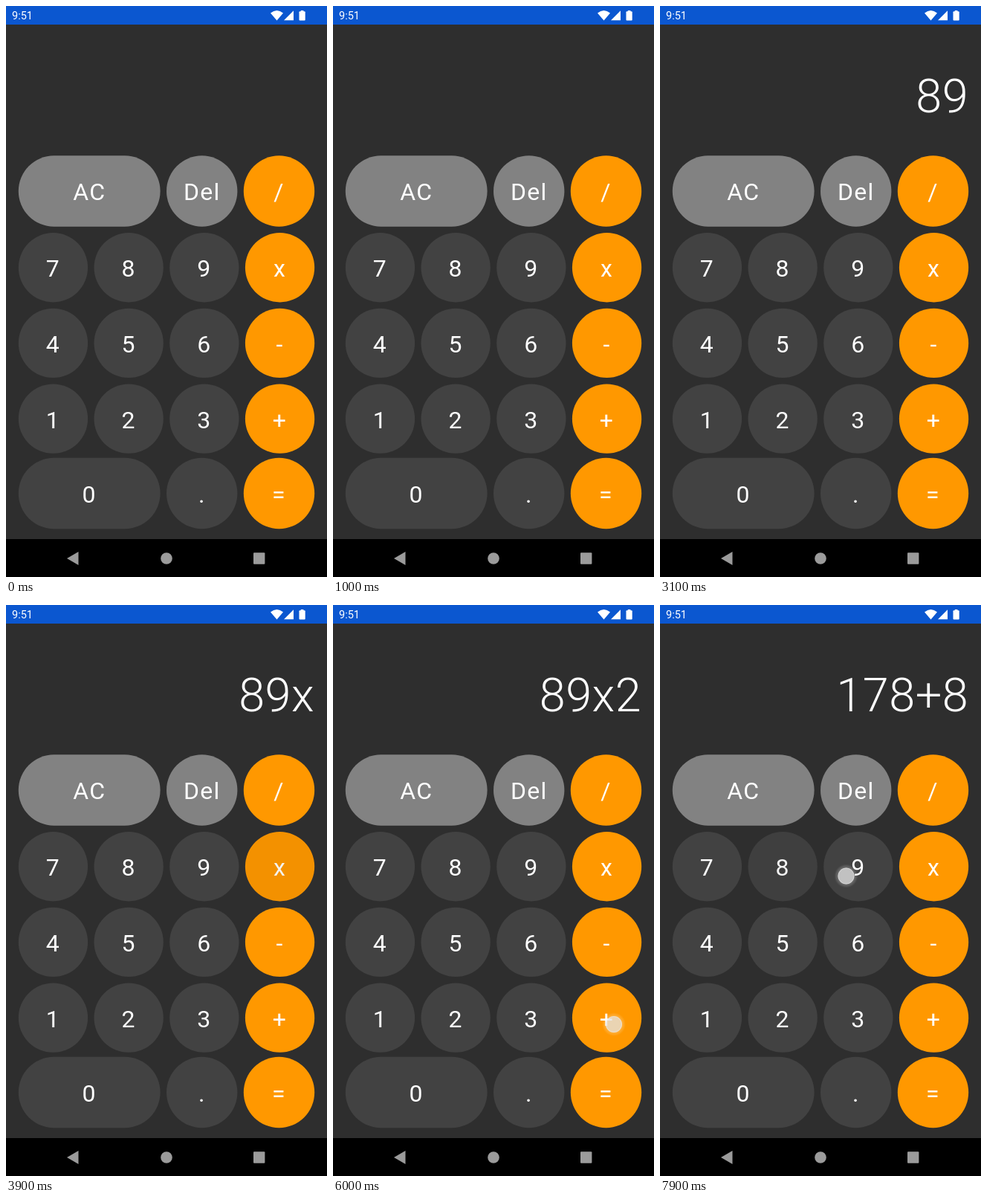
An HTML page with a canvas that plays this animation: 432x768 px, repeating every 8000 ms.

```html
<!DOCTYPE html>
<html lang="en">
<head>
<meta charset="utf-8">
<title>Calculator</title>
<style>
  html, body { margin: 0; width: 100%; height: 100%; overflow: hidden; background: #2e2e2e; }
  canvas { display: block; width: 432px; height: 768px; }
</style>
</head>
<body>
<canvas id="stage"></canvas>
<script>
const W = 432, H = 768, LOOP = 8000, STEP = 100;
const LIGHT = '#828282', DARK = '#424242', ORANGE = '#ff9800';
const canvas = document.getElementById('stage');
const ctx = canvas.getContext('2d');
const dpr = window.devicePixelRatio || 1;
canvas.width = W * dpr;
canvas.height = H * dpr;

const LEFT = 16.8, GAP = 8.4, BIG = 95.4, SMALL = 93.3;
const rows = [
  { y: 201.3, size: BIG, keys: ['AC', 'Del', '/'], wide: true },
  { y: 305.1, size: SMALL, keys: ['7', '8', '9', 'x'] },
  { y: 406.8, size: SMALL, keys: ['4', '5', '6', '-'] },
  { y: 508.5, size: SMALL, keys: ['1', '2', '3', '+'] },
  { y: 607.8, size: BIG, keys: ['0', '.', '='], wide: true }
];

const buttons = rows.flatMap(({ y, size, keys, wide }) => {
  let x = LEFT;
  return keys.map((label, i) => {
    const w = wide && i === 0 ? size * 2 : size;
    const color = i === keys.length - 1 ? ORANGE : /^(AC|Del)$/.test(label) ? LIGHT : DARK;
    const button = { label, x, y, w, h: size, color };
    x += w + GAP;
    return button;
  });
});

// down: finger lands, hold: time until it lifts and the display updates
const taps = [
  { key: '8', x: 151, y: 365, down: 1900, hold: 200, shows: '8' },
  { key: '9', x: 252, y: 365, down: 2300, hold: 200, shows: '89' },
  { key: 'x', x: 376, y: 366, down: 3500, hold: 200, shows: '89x' },
  { key: '2', x: 168, y: 565, down: 4200, hold: 200, shows: '89x2' },
  { key: '+', x: 378, y: 564, down: 6000, hold: 300, shows: '178+' },
  { key: '8', x: 151, y: 365, down: 7500, hold: 200, shows: '178+8' },
  { key: '9', x: 250.5, y: 364.5, down: 7900, hold: 200, shows: '178+89' }
];

const clamp = v => Math.max(0, Math.min(1, v));

function text(str, x, y, font, align, spacing = 0) {
  ctx.font = font + ' Roboto, sans-serif';
  ctx.textAlign = align;
  ctx.letterSpacing = spacing + 'px';
  ctx.fillStyle = '#fff';
  ctx.fillText(str, x, y);
}

function shape(color, draw) {
  ctx.fillStyle = color;
  ctx.beginPath();
  draw();
  ctx.fill();
}

function polygon(color, ...points) {
  shape(color, () => points.forEach(([x, y]) => ctx.lineTo(x, y)));
}

function disc(color, x, y, r) {
  shape(color, () => ctx.arc(x, y, r, 0, Math.PI * 2));
}

function box(color, x, y, w, h, r = 0) {
  shape(color, () => ctx.roundRect(x, y, w, h, r));
}

function statusBar() {
  box('#0b57d0', 0, 0, W, 25);
  text('9:51', 8, 18, '14.5px', 'left');
  shape('#fff', () => {
    ctx.moveTo(364.5, 19.5);
    ctx.lineTo(356, 9.5);
    ctx.quadraticCurveTo(364.5, 2.5, 373, 9.5);
  });
  polygon('#fff', [374, 19.3], [387, 19.3], [387, 6.3]);
  box('#fff', 394.5, 7.3, 8.2, 12.2, 1);
  box('#fff', 396.8, 6, 3.6, 2);
}

function navBar() {
  const gray = '#9b9b9b';
  box('#000', 0, 717, W, H - 717);
  polygon(gray, [82, 743], [97.5, 734], [97.5, 752]);
  disc(gray, 216, 743, 7.8);
  box(gray, 333, 735.3, 15.4, 15.4, 1);
}

function ripple(tap, t) {
  const age = t - tap.down, fadeStart = tap.hold + 50;
  const alpha = 0.12 * clamp((age - 25) / 75) * clamp(1 - (age - fadeStart) / 250);
  if (alpha <= 0) return;
  disc(`rgba(0,0,0,${alpha})`, tap.x, tap.y, 20 + 90 * clamp((age - 25) / 150));
}

function button(b, t) {
  ctx.save();
  ctx.beginPath();
  ctx.roundRect(b.x, b.y, b.w, b.h, b.h / 2);
  ctx.fillStyle = b.color;
  ctx.fill();
  text(b.label, b.x + b.w / 2, b.y + b.h / 2 + 12.4, '32px', 'center', 1.2);
  const pressed = taps.filter(tap => tap.key === b.label && t > tap.down);
  if (pressed.length) {
    ctx.clip();
    pressed.forEach(tap => ripple(tap, t));
  }
  ctx.restore();
}

function finger({ x, y }) {
  const halo = ctx.createRadialGradient(x, y, 10, x, y, 16);
  halo.addColorStop(0, 'rgba(255,255,255,0.28)');
  halo.addColorStop(1, 'rgba(255,255,255,0)');
  disc(halo, x, y, 16);
  disc('rgba(225,225,225,0.7)', x, y, 11);
  ctx.strokeStyle = 'rgba(245,245,245,0.4)';
  ctx.lineWidth = 1;
  ctx.beginPath();
  ctx.arc(x, y, 10.5, 0, Math.PI * 2);
  ctx.stroke();
}

function draw(t) {
  ctx.setTransform(dpr, 0, 0, dpr, 0, 0);
  box('#2e2e2e', 0, 0, W, H);
  statusBar();
  const last = taps.filter(tap => t >= tap.down + tap.hold).pop();
  if (last) text(last.shows, 415.2, 142.5, '300 63px', 'right', 0.5);
  buttons.forEach(b => button(b, t));
  navBar();
  taps.filter(tap => t >= tap.down && t < tap.down + tap.hold).forEach(finger);
}

const start = performance.now();
function frame() {
  const t = (performance.now() - start) % LOOP;
  draw(Math.floor(t / STEP) * STEP);
  requestAnimationFrame(frame);
}
frame();
</script>
</body>
</html>
```
